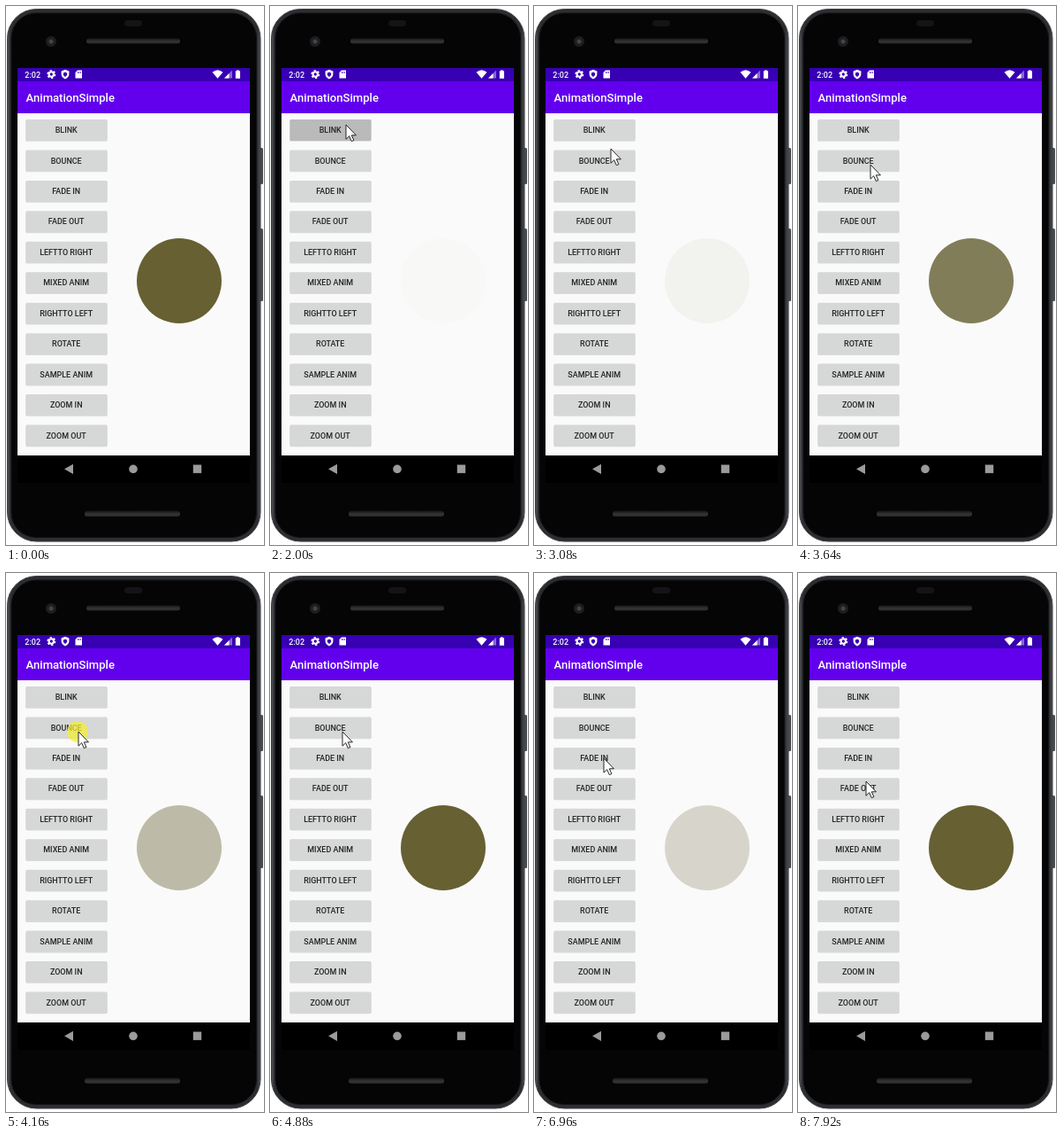
Write an HTML page that moves like this. It is 292 px wide and 608 px high and loops after 8000 ms.

```html
<!DOCTYPE html>
<html lang="en">
<head>
<meta charset="utf-8">
<title>Animation demo</title>
<style>
  html, body { margin: 0; width: 100%; height: 100%; overflow: hidden; background: #fff; }
  svg { display: block; width: 292px; height: 608px; }
  text { font-family: Roboto, "Noto Sans", sans-serif; font-weight: 500; }
</style>
</head>
<body>
<svg viewBox="0 0 292 608">
  <defs>
    <linearGradient id="rim">
      <stop offset="0" stop-color="#55585b"/>
      <stop offset=".012" stop-color="#2b2d30"/>
      <stop offset=".988" stop-color="#2b2d30"/>
      <stop offset="1" stop-color="#505356"/>
    </linearGradient>
    <linearGradient id="slot" x2="0" y2="1">
      <stop offset="0" stop-color="#161616"/>
      <stop offset=".6" stop-color="#343536"/>
      <stop offset="1" stop-color="#242526"/>
    </linearGradient>
  </defs>

  <!-- phone body -->
  <g fill="#4b4e50">
    <rect x="286" y="160" width="5" height="41" rx="1.5"/>
    <rect x="286" y="251" width="5" height="82" rx="1.5"/>
  </g>
  <rect x="1.5" y="3.5" width="286.5" height="600.5" rx="33" fill="url(#rim)" stroke="#3e4143"/>
  <rect x="6" y="8" width="277.5" height="591.5" rx="28" fill="#050505" stroke="#141516"/>
  <rect x="134" y="16" width="20" height="7" rx="3.5" fill="#141416"/>
  <rect x="91" y="36.5" width="106" height="6" rx="3" fill="url(#slot)"/>
  <rect x="89" y="569.5" width="108" height="6.5" rx="3" fill="url(#slot)"/>
  <circle cx="51" cy="40" r="6" fill="#1d1e20"/>
  <circle cx="51" cy="40" r="2.5" fill="#414449"/>

  <!-- screen -->
  <path d="M13 70h263v468H13z"/>
  <path d="M13 70h263v15H13z" fill="#3700b3"/>
  <path d="M13 85h263v36H13z" fill="#6200ee"/>
  <path d="M13 121h263v386H13z" fill="#fafafa"/>

  <g fill="#fff">
    <text x="21.3" y="80.7" font-size="9">2:02</text>
    <text x="22.6" y="107.7" font-size="13.1">AnimationSimple</text>
    <circle cx="51.3" cy="77" r="2.7" fill="none" stroke="#fff" stroke-width="2.1"/>
    <circle cx="51.3" cy="77" r="4.2" fill="none" stroke="#fff" stroke-width="1.6" stroke-dasharray="2.2 2.198"/>
    <path d="M67 71.8l4.4 1.8v3.2q0 3.8-4.4 5.6q-4.4-1.8-4.4-5.6v-3.2z"/>
    <path d="M67 74.6l2.2 1.1v1.4q0 1.8-2.2 2.8q-2.2-1-2.2-2.8v-1.4z" fill="#3700b3"/>
    <path d="M81 72.5h5v9h-7.5v-6.5z"/>
    <path d="M81.2 74v2m1.6-2v2m1.6-2v2" stroke="#3700b3" stroke-width=".7"/>
    <path d="M233.5 74.8q6-5 12 0l-6 7z"/>
    <path d="M256 72.5v9h-9z" opacity=".4"/>
    <path d="M252.5 76v5.5H247z"/>
    <path d="M261.3 72.3h2.2v1h1.5v8.4h-5.2v-8.4h1.5z"/>
  </g>

  <g fill="#9b9b9b">
    <path d="M66 522.3l10-5.6v11.2z"/>
    <circle cx="144" cy="522.3" r="4.8"/>
    <path d="M211.8 517.5h9.4v9.4h-9.4z"/>
  </g>

  <g id="buttons" font-size="8.96" text-anchor="middle"></g>
  <circle id="badge" cx="196" cy="310" r="48" fill="#666033"/>
  <circle id="halo" r="12" fill="#f4ee30" opacity=".72"/>
  <path id="cursor" d="M0 0V16.2L3.7 12.7L6.3 18.6L8.9 17.5L6.3 11.8H11.4Z" fill="#fff" stroke="#111" stroke-width=".9"/>
</svg>
<script>
const LOOP = 8000;
const $ = id => document.getElementById(id);
const clamp = v => Math.min(1, Math.max(0, v));
const smooth = v => (1 - Math.cos(Math.PI * clamp(v))) / 2;
const between = (t, a, b) => t >= a && t < b;

const labels = ['BLINK', 'BOUNCE', 'FADE IN', 'FADE OUT', 'LEFTTO RIGHT', 'MIXED ANIM',
  'RIGHTTO LEFT', 'ROTATE', 'SAMPLE ANIM', 'ZOOM IN', 'ZOOM OUT'];

$('buttons').innerHTML = labels.map((label, i) => {
  const y = 140 + 34.45 * i;
  return `<rect x="22.3" y="${y - 11.4}" width="92.4" height="24.2" rx="1.5" fill="#c4c5c5" opacity=".6"/>
    <rect class="face" x="22.5" y="${y - 12}" width="92" height="24" rx="1.4"/>
    <text x="68.2" y="${y + 3.1}" fill="#252525">${label}</text>`;
}).join('');
const faces = document.querySelectorAll('.face');

// Pointer stops: time, x, y
const stops = [
  [520, 245, 567], [1280, 91, 131], [1360, 88, 133], [1440, 86, 134],
  [2760, 86, 134], [3080, 87, 161], [3400, 83, 178], [3520, 82, 179],
  [6000, 82, 179], [6360, 79, 209], [7440, 79, 209], [7840, 77, 235]
];

// Halo on, halo off, button pressed, button released
const clicks = [
  [1760, 1960, 1880, 2240],
  [4080, 4240, 4200, 4480],
  [6520, 6680, 6600, 6880]
];

// Blink turning points: time, opacity
const blink = [[1960, 0], [2560, 1], [3170, 0], [3830, 1], [4430, 0]];
const bounceStart = 4300, bounceEnd = 4880;
const fadeStart = 6640, fadeEnd = 7640;

function along(keys, t, ease) {
  const next = keys.findIndex(k => k[0] > t);
  if (next < 0) return keys[keys.length - 1].slice(1);
  if (next === 0) return keys[0].slice(1);
  const a = keys[next - 1], b = keys[next];
  const p = ease((t - a[0]) / (b[0] - a[0]));
  return a.slice(1).map((v, i) => v + (b[i + 1] - v) * p);
}

function bounce(v) {
  const t = clamp(v) * 1.1226;
  const arc = (mid, base) => 8 * (t - mid) ** 2 + base;
  if (t < 0.3535) return arc(0, 0);
  if (t < 0.7408) return arc(0.54719, 0.7);
  if (t < 0.9644) return arc(0.8526, 0.9);
  return arc(1.0435, 0.95);
}

function badgeOpacity(t) {
  if (between(t, blink[0][0], bounceStart)) return along(blink, t, smooth)[0];
  if (t >= fadeStart) return smooth((t - fadeStart) / (fadeEnd - fadeStart));
  return 1;
}

function draw(t) {
  const [x, y] = along(stops, t, v => v);
  $('cursor').setAttribute('transform', `translate(${x} ${y})`);
  $('cursor').style.display = t < stops[0][0] ? 'none' : '';
  $('halo').setAttribute('transform', `translate(${x - 1} ${y})`);
  $('halo').style.display = clicks.some(c => between(t, c[0], c[1])) ? '' : 'none';

  faces.forEach((face, i) => {
    const c = clicks[i];
    face.setAttribute('fill', c && between(t, c[2], c[3]) ? '#bababa' : '#d6d7d7');
  });

  const scale = between(t, bounceStart, bounceEnd)
    ? bounce((t - bounceStart) / (bounceEnd - bounceStart)) : 1;
  $('badge').setAttribute('transform', `translate(0 262) scale(1 ${scale}) translate(0 -262)`);
  $('badge').setAttribute('opacity', badgeOpacity(t));
}

const start = performance.now();
function tick() {
  draw((performance.now() - start) % LOOP);
  requestAnimationFrame(tick);
}
tick();
</script>
</body>
</html>
```
